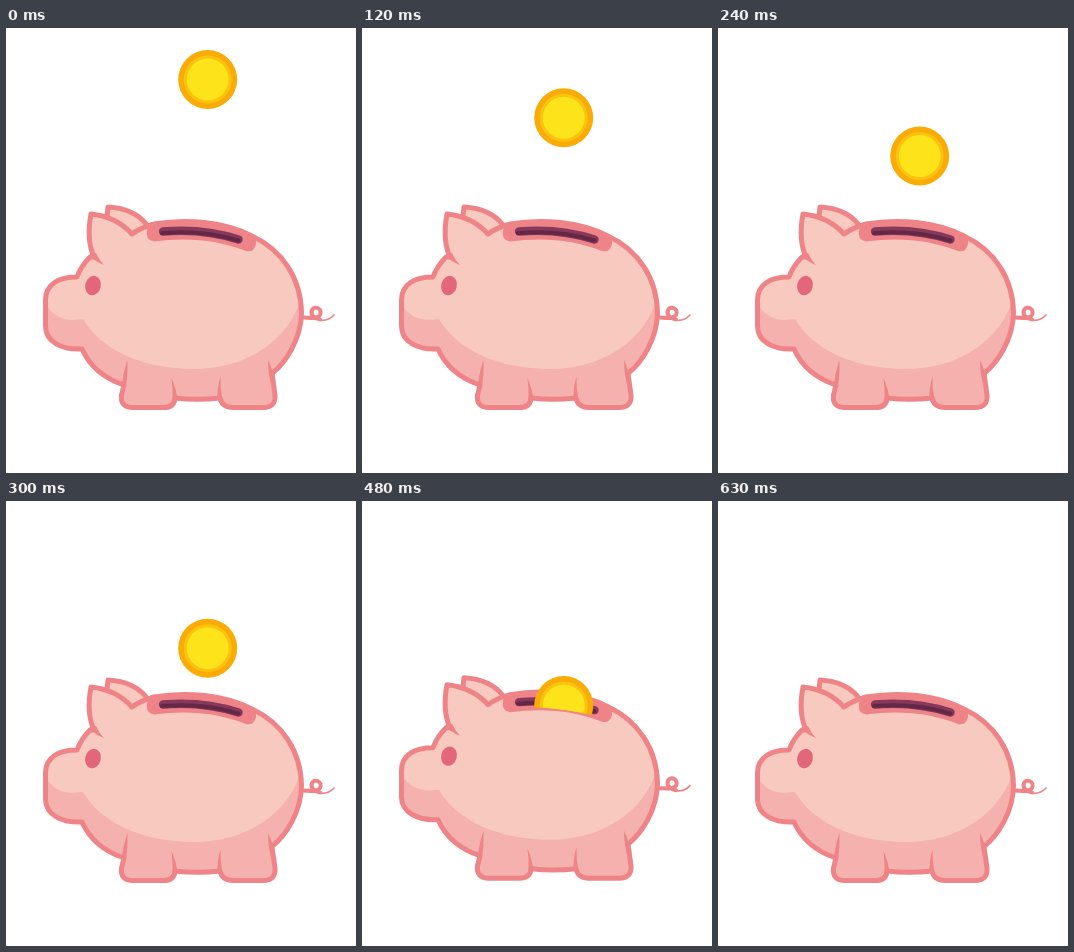
An HTML page for the animation above (900 ms loop, 350 by 445 pixels).

```html
<!DOCTYPE html>
<html lang="en">
<head>
<meta charset="utf-8">
<title>Piggy bank</title>
<style>
html, body { margin: 0; width: 100%; height: 100%; overflow: hidden; background: #fff; }
svg { display: block; width: 100vw; height: 100vh; }
.line { fill: none; stroke: #ef8488; stroke-width: 5; stroke-linecap: round; stroke-linejoin: round; }
.light { fill: #f8c9bf; }
.shade { fill: #f5b1ad; }
.tip { fill: #ef8488; }
</style>
</head>
<body>
<svg viewBox="0 0 350 445">
  <defs>
    <path id="body" d="M84 229 Q75 238 71 249 C53 249 39.500 256 39.500 272 V298 C39.500 314 56 322 76 321
      C84 339 100 351 118 357 L115.500 367 Q114 379.500 127 379.500 H157 Q168.500 379.500 169 370 Q191 372.500 214 370
      Q216 379.500 227 379.500 H257 Q270 379.500 269 367 L266 345.500 C280 334.500 295 311 295.500 285
      C295 250 276 222 246 208 C218 193.500 180 190.500 148 196 Q134 200 126 206
      C117 196 104 188 85 186 C82 202 82 216 88 229 Z"/>
    <clipPath id="inside"><use href="#body"/></clipPath>
    <clipPath id="above"><path d="M0 -60 H350 V217.500 H234 Q198 207.500 157 209 H0 Z"/></clipPath>
  </defs>
  <g id="pig">
    <path class="line" style="stroke-width:4" d="M297 289.500 C303 289.500 311 291.500 314 287 C317 281 309 277 306 282 C304 287 309 291 314 291.500"/>
    <path class="line" style="stroke-width:1.700" d="M313 292 Q322 293.500 328 287"/>
    <path class="light" d="M102 179 C119 180 133 186.500 141 197 L126 206 L101 190 Z"/>
    <path class="line" d="M101 188 L102 179 C119 180 133 186.500 141 197"/>
    <use href="#body" class="light"/>
    <g clip-path="url(#inside)">
      <path class="shade" d="M37 270 C44 289 59 294 77 291 C95 322 137 341 188 341
        C240 341 285 313 297 264 L320 400 H20 Z"/>
    </g>
    <use href="#body" class="line"/>
    <path class="tip" d="M83 227 Q88 233 98 237 Q93 232 90 225 Z"/>
    <path class="tip" d="M121.500 332 Q117 345 115.500 360 L120 360 Q122 346 121.500 332 Z"/>
    <path class="tip" d="M165.500 350 Q167 361 166.500 372 L171.500 372 Q170 360 165.500 350 Z"/>
    <path class="tip" d="M214.500 348 Q211 360 211.500 372 L216.500 372 Q214 360 214.500 348 Z"/>
    <path class="tip" d="M262 332 Q262 345 265 356 L268.500 354 Q267 342 262 332 Z"/>
    <ellipse cx="87" cy="257.500" rx="7.800" ry="9.800" transform="rotate(14 87 257.500)" fill="#e3667b"/>
    <path class="tip" d="M145 195 C181 189 217 193 249 209 Q252 216 247 222 Q244 224 240 223 C212 212 182 209 148 213.500 Q139 212 141 202 Z"/>
    <path class="line" style="stroke:#86395a;stroke-width:8.400" d="M157 203.500 Q197 200 232.500 211.500"/>
    <path class="line" style="stroke:#642746;stroke-width:4" d="M156 205 Q197 201.500 232.500 212.500"/>
    <g clip-path="url(#above)">
      <g id="coin">
        <circle r="29.500" fill="#f9ab06"/>
        <circle r="24" fill="#fbc20f"/>
        <circle r="21" fill="#fce31a"/>
      </g>
    </g>
  </g>
</svg>
<script>
const LOOP = 900, STEP = 30;
const pig = document.getElementById('pig');
const coin = document.getElementById('coin');

function lift(t) {
  if (t < 390 || t >= 630) return 0;
  return t <= 570 ? (t - 390) / 180 * 4.7 : (630 - t) / 60 * 4.7;
}

function draw(now) {
  const t = Math.floor(now % LOOP / STEP) * STEP;
  const up = lift(t);
  pig.setAttribute('transform', `translate(0 ${-up})`);
  coin.setAttribute('transform', `translate(201.7 ${51.5 + t * 0.3188 + up})`);
  coin.style.display = t < 600 ? '' : 'none';
}

const start = performance.now();
function tick() {
  draw(performance.now() - start);
  requestAnimationFrame(tick);
}
tick();
</script>
</body>
</html>
```
